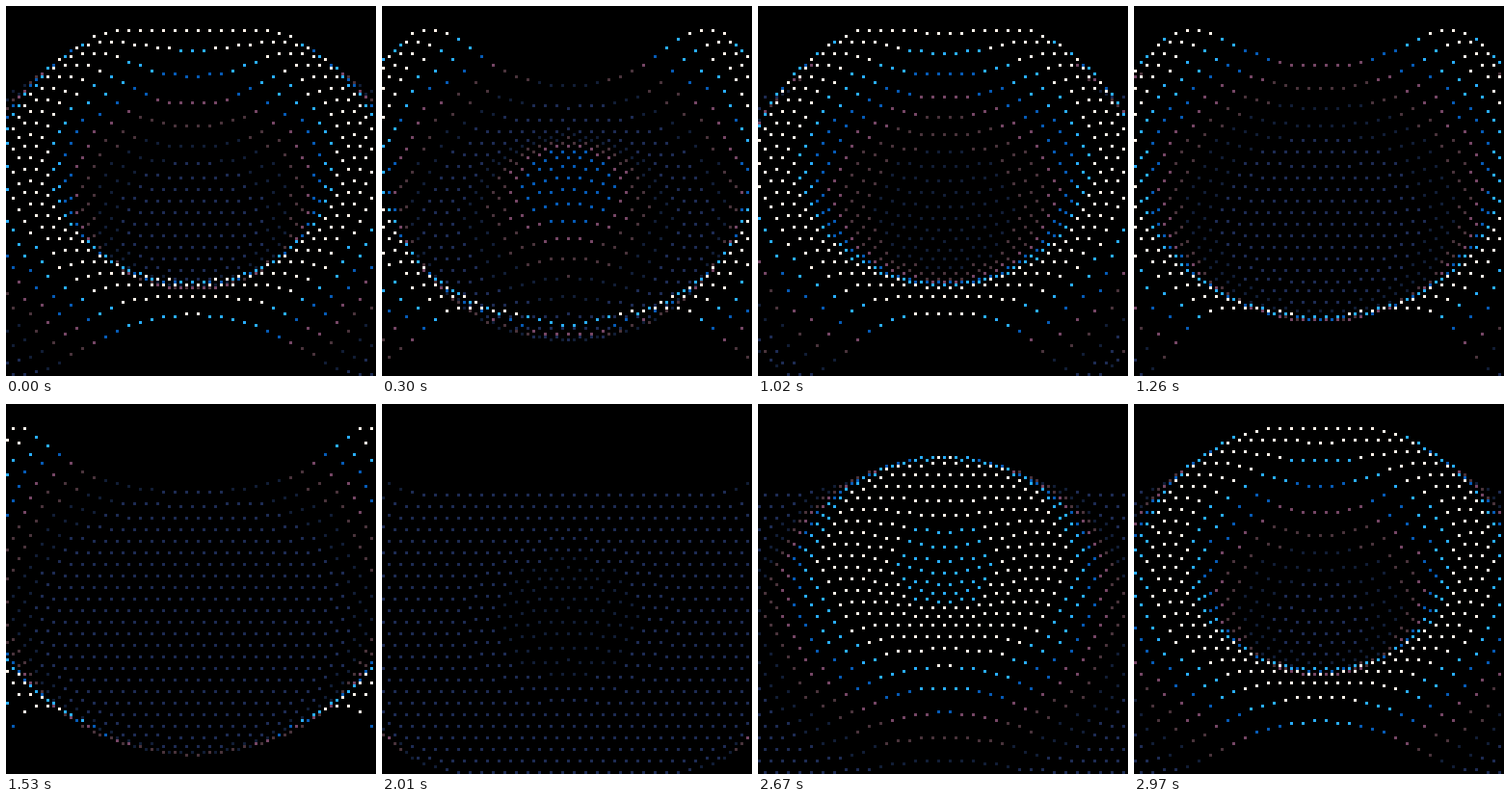
Animation of 384x384 px, one loop 3 s. Source, as an HTML page with a canvas:

```html
<!DOCTYPE html>
<html lang="en">
<head>
<meta charset="utf-8">
<title>Dot ripple</title>
<style>
  html, body { margin: 0; width: 100%; height: 100%; overflow: hidden; background: #000; }
  canvas { display: block; width: 384px; height: 384px; }
</style>
</head>
<body>
<canvas id="stage" width="384" height="384"></canvas>
<script>
const ctx = document.getElementById('stage').getContext('2d');
const LOOP = 3000, STEP = 30, PERIOD = 99;
const DOT = 3, GAP = 4, ROWS = 25, TOP = 31;
const CX = 64, CY = 75;

// Lift of a dot, sampled every two ticks away from the middle of the double pulse.
const LIFT = [0.1, 0.8, 3, 6.4, 10.8, 16, 20.3, 22.7, 23.8, 23.4, 22.2, 19.4,
  16.3, 12.9, 9.8, 7.1, 4.7, 2.8, 1.6, 1.05, 0.5, 0.2, 0];

// Lowest lift for each colour, highest first.
const BANDS = [
  [21, '#fff1e8'], [17, '#29adff'], [13, '#065ab5'], [10, '#754665'],
  [6, '#49333b'], [2, '#111d35'], [0, '#1d2b53']
];

const sample = i => LIFT[Math.abs(i)] || 0;

function lift(ticks) {
  const p = ticks / 2, i = Math.floor(p), f = p - i;
  const [a, b, c, d] = [sample(i - 1), sample(i), sample(i + 1), sample(i + 2)];
  const v = b + f / 2 * (c - a + f * (2 * a - 5 * b + 4 * c - d + f * (3 * (b - c) + d - a)));
  return Math.max(0, Math.floor(v));
}

// The wave slows slightly before the loop closes.
function tickAt(ms) {
  const n = Math.floor(ms / STEP);
  return n <= 80 ? n : 80 + (n - 80) * 17 / 19;
}

// Ticks the wave needs to reach a point; it spreads faster sideways.
const delay = (x, y) => (x - CX) ** 2 / 192 + (y - CY) ** 2 / 128;

function draw(ms) {
  const tick = tickAt(ms) + 0.3;
  ctx.fillStyle = '#000';
  ctx.fillRect(0, 0, 384, 384);
  for (let row = 0; row < ROWS; row++) {
    const y = TOP + row * GAP;
    for (let x = row % 2 ? 0 : 2; x < 128; x += GAP) {
      const phase = tick - delay(x, y);
      const h = lift(Math.abs(phase - PERIOD * Math.round(phase / PERIOD)));
      ctx.fillStyle = BANDS.find(b => h >= b[0])[1];
      ctx.fillRect(x * DOT, (y - h) * DOT, DOT, DOT);
    }
  }
}

const start = performance.now();
function loop(now) {
  draw(Math.max(0, now - start) % LOOP);
  requestAnimationFrame(loop);
}
draw(0);
requestAnimationFrame(loop);
</script>
</body>
</html>
```
